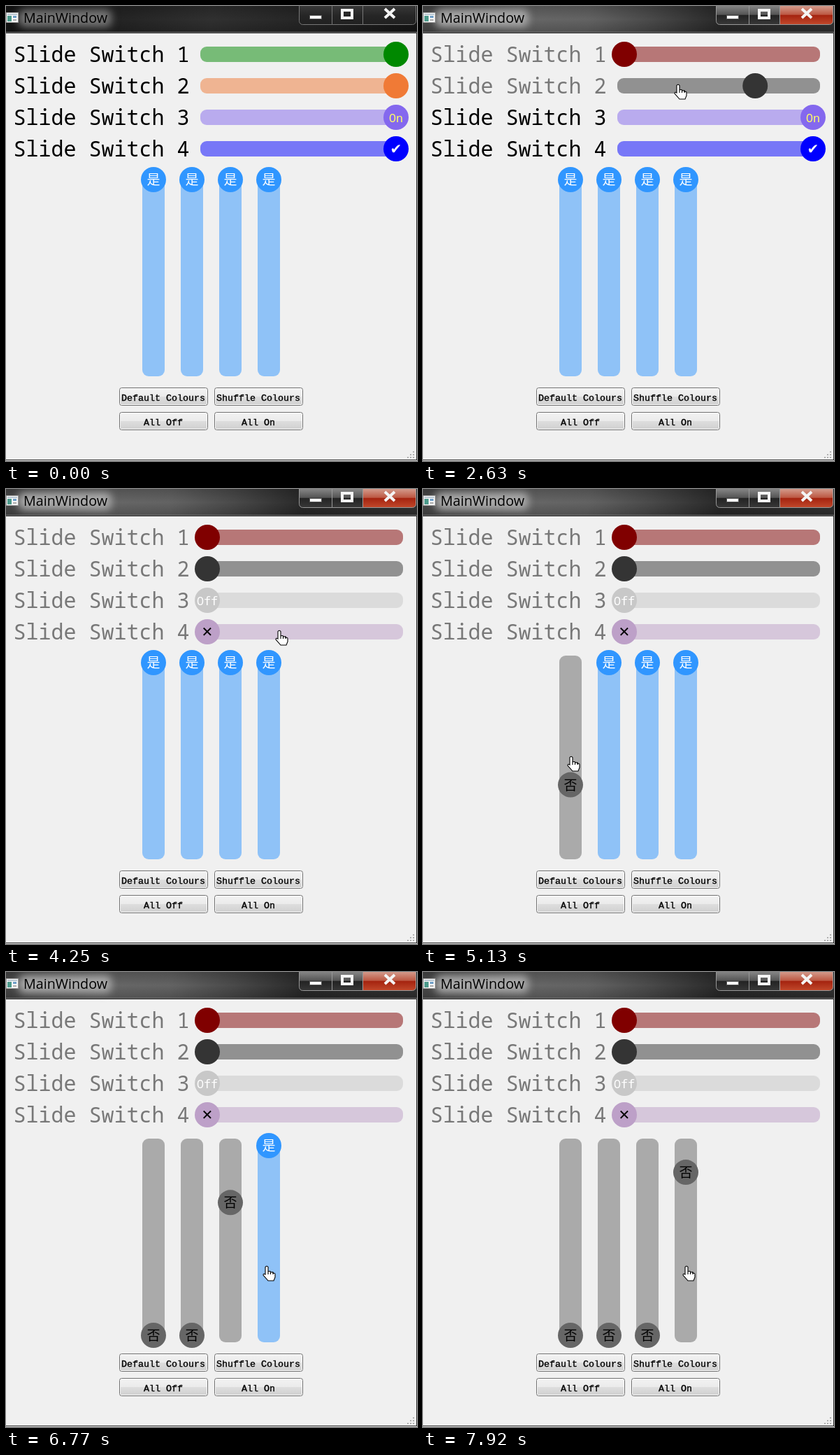
Write an HTML page with a canvas that moves like this. It is 588 px wide and 650 px high and loops after 8000 ms.

```html
<!DOCTYPE html>
<html lang="en">
<head>
<meta charset="utf-8">
<title>Slide switches</title>
<style>
html, body { margin: 0; width: 588px; height: 650px; overflow: hidden; }
canvas { display: block; }
</style>
</head>
<body>
<canvas id="stage" width="588" height="650"></canvas>
<script>
const ctx = document.getElementById('stage').getContext('2d');
const LOOP = 8000, ACTIVE_AT = 1850, HAND_AT = 1620;
const MONO = '"Noto Sans Mono", monospace';
const CJK = '"Noto Sans CJK SC", "Noto Sans CJK", sans-serif';
const SYMBOL = '"DejaVu Sans", sans-serif';

// start and dur time the slide; on and off hold colour, text and text colour
const rows = [
  { start: 1885, on: ['#008800'], off: ['#800000'] },
  { start: 2585, on: ['#f07a36'], off: ['#343434'] },
  { start: 3272, on: ['#8468ee', 'On', '#ffff66'], off: ['#c8c8c8', 'Off', '#fff'], font: '16.6px ' + MONO },
  { start: 3802, on: ['#0000ff', '✔', '#fff'], off: ['#bda0c8', '✕', '#000'], font: '20px ' + SYMBOL }
].map((s, i) => ({ ...s, dur: 150, y: 69 + 45 * i }));

const columns = [[4970, 250], [5676, 500], [6471, 1000], [7640, 2000]].map(([start, dur], i) => ({
  start, dur, x: 211 + 55 * i, font: '19px ' + CJK,
  on: ['#3096ff', '是', '#fff'], off: ['#666666', '否', '#000']
}));

const presses = [1850, 2550, 3240, 3770, 4960, 5670, 6440, 7610];

const path = [
  [610, 478, 603], [679, 478, 603], [680, 495, 576], [860, 495, 576],
  [1320, 352, 60], [1390, 361, 56], [2000, 361, 56], [2330, 365, 112],
  [2700, 365, 112], [3010, 400, 163], [3430, 400, 163], [3620, 398, 205],
  [4180, 398, 205], [4250, 391, 202], [4790, 212, 382], [5200, 212, 382],
  [5500, 258, 411], [5900, 258, 411], [6290, 325, 415], [6520, 325, 415],
  [6750, 373, 420], [7100, 373, 420], [7230, 377, 420], [LOOP, 377, 420]
];

const ARROW = new Path2D('M0 0V16L4 12.5 6.5 18.5 9 17.5 6.5 12H12Z');
const HAND = new Path2D('M-2 1.5Q0-1 2 1.5V8Q5 6.5 6 9Q9 8 9.5 10.5Q12 9.5 12 12V16L10 21H2L-5 13Q-5 10-2 12Z');

const mix = (a, b, p) => a + (b - a) * p;
const progress = (t, start, dur) => Math.min(1, Math.max(0, (t - start) / dur));

function rect(x, y, w, h, fill, r = 0, stroke) {
  ctx.beginPath();
  ctx.roundRect(x, y, w, h, r);
  ctx.fillStyle = fill;
  ctx.fill();
  if (stroke) { ctx.strokeStyle = stroke; ctx.lineWidth = 1; ctx.stroke(); }
}

function disc(x, y, r, fill) {
  ctx.beginPath();
  ctx.arc(x, y, r, 0, 7);
  ctx.fillStyle = fill;
  ctx.fill();
}

function text(str, x, y, font, fill, align = 'left') {
  ctx.font = font;
  ctx.fillStyle = fill;
  ctx.textAlign = align;
  ctx.fillText(str, x, y);
}

function gradient(x, y, stops) {
  const g = ctx.createLinearGradient(0, 0, x, y);
  for (const [p, c] of stops) g.addColorStop(p, c);
  return g;
}

function titleBar(active) {
  const tones = active
    ? [[0, '#484848'], [.28, '#666'], [.4, '#636363'], [.55, '#4a4a4a'], [.72, '#292929'], [1, '#333']]
    : [[0, '#151515'], [.28, '#242424'], [.5, '#303030'], [.75, '#242424'], [1, '#151515']];
  rect(0, 0, 588, 38, gradient(588, 60, tones));
  rect(0, 0, 588, 38, gradient(0, 38, [[0, '#0003'], [.5, '#0000'], [1, '#0003']]));
  ctx.filter = 'blur(6px)';
  rect(18, 5, 133, 25, active ? '#aaa' : '#777', 8);
  ctx.filter = 'none';
  rect(0, 37, 588, 1, '#777');
  rect(0, 38, 588, 1, '#181818');

  rect(.5, 9.5, 17, 14, '#f5f5f5', 0, '#999');
  rect(2, 11, 14, 2, '#b9c7d2');
  rect(2, 14, 6, 8, '#4c9a8b');
  rect(10, 14, 5, 3, '#6f9fc8');
  rect(10, 19, 5, 2, '#aaa');
  text('MainWindow', 25, 24, '19.7px "Open Sans", sans-serif', '#000');

  const dark = active
    ? gradient(0, 27, [[0, '#858585'], [.45, '#555'], [.5, '#242424'], [1, '#383838']])
    : gradient(0, 27, [[0, '#383838'], [.5, '#262626'], [1, '#202020']]);
  const red = gradient(0, 27, [[0, '#d39a8b'], [.45, '#bd5944'], [.5, '#a52410'], [1, '#c24a2c']]);
  const edge = active ? '#999' : '#777';
  rect(419.5, -1.5, 47, 28, dark, [0, 0, 0, 5], edge);
  rect(466.5, -1.5, 44, 28, dark, 0, edge);
  rect(510.5, -1.5, 76, 28, active ? red : dark, [0, 0, 5, 0], edge);

  rect(434.5, 13.5, 17, 5, '#fff', 0, '#555');
  ctx.strokeStyle = '#f4f4f4';
  ctx.lineWidth = 4;
  ctx.strokeRect(481, 6, 14, 11);
  ctx.beginPath();
  ctx.moveTo(542, 4); ctx.lineTo(556, 17);
  ctx.moveTo(556, 4); ctx.lineTo(542, 17);
  ctx.stroke();
}

function knob(s, x, y, [fill, label, ink]) {
  disc(x, y, 18, fill);
  if (label) text(label, x, y + (s.x ? 7 : 6.5), s.font, ink, 'center');
}

function track(x, y, w, h, fill) {
  ctx.globalAlpha = .5;
  rect(x, y, w, h, fill, 9);
  ctx.globalAlpha = 1;
}

function drawSwitches(t) {
  rows.forEach((s, i) => {
    const look = t < s.start ? s.on : s.off;
    text('Slide Switch ' + (i + 1), 10.5, s.y + 11, '30px ' + MONO, t < s.start ? '#000' : '#787878');
    track(278, s.y - 11, 290, 22, look[0]);
    knob(s, mix(558, 288, progress(t, s.start, s.dur)), s.y, look);
  });
  for (const s of columns) {
    const look = t < s.start ? s.on : s.off;
    track(s.x - 16, 238, 32, 291, look[0]);
    knob(s, s.x, mix(248, 519, progress(t, s.start, s.dur)), look);
  }
}

function button(label, x, y) {
  const face = ctx.createLinearGradient(0, y, 0, y + 26);
  [[0, '#f3f3f3'], [.48, '#ebebeb'], [.52, '#dddddd'], [1, '#cfcfcf']].forEach(s => face.addColorStop(...s));
  rect(x + .5, y + .5, 126, 25, '#fcfcfc', 3, '#707070');
  rect(x + 2, y + 2, 123, 22, face, 1);
  text(label, x + 63, y + 19, '13.33px "Liberation Mono", monospace', '#000', 'center');
  ctx.strokeStyle = '#000';
  ctx.lineWidth = .35;
  ctx.strokeText(label, x + 63, y + 19);
}

function drawCursor(t) {
  if (t < path[0][0]) return;
  const i = path.findIndex(k => k[0] > t);
  const [t0, x0, y0] = path[i - 1], [t1, x1, y1] = path[i];
  const p = progress(t, t0, t1 - t0), e = p * p * (3 - 2 * p);
  const x = mix(x0, x1, e), y = mix(y0, y1, e);
  if (presses.some(at => t >= at && t < at + 75)) disc(x, y + 1, 15, 'rgba(255,255,0,.5)');
  const shape = t < HAND_AT ? ARROW : HAND;
  ctx.save();
  ctx.translate(x, y);
  ctx.fillStyle = '#fff';
  ctx.fill(shape);
  ctx.strokeStyle = '#000';
  ctx.lineWidth = 1.1;
  ctx.stroke(shape);
  if (shape === HAND) {
    ctx.beginPath();
    for (const kx of [2, 5.5, 9]) { ctx.moveTo(kx, 8.5); ctx.lineTo(kx, 12); }
    ctx.stroke();
  }
  ctx.restore();
}

function draw() {
  const t = performance.now() % LOOP;
  rect(0, 0, 588, 650, '#f0f0f0');
  titleBar(t >= ACTIVE_AT);
  drawSwitches(t);
  button('Default Colours', 162, 545);
  button('Shuffle Colours', 298, 545);
  button('All Off', 162, 580);
  button('All On', 298, 580);
  for (let r = 0; r < 3; r++)
    for (let c = 0; c <= r; c++) rect(582 - 4 * c, 636 + 4 * r, 2, 2, '#b0b0b0');
  rect(587, 38, 1, 611, '#333');
  rect(0, 648, 588, 1, '#222');
  drawCursor(t);
  requestAnimationFrame(draw);
}
draw();
</script>
</body>
</html>
```
